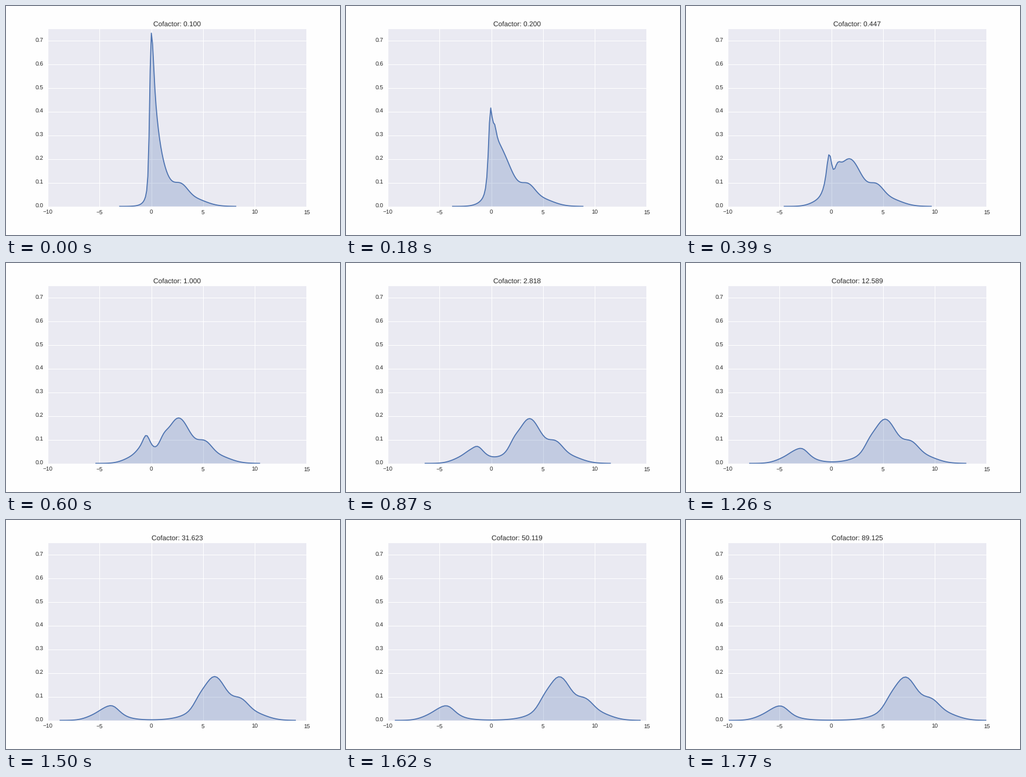
Animation, 576 px wide and 396 px high, one loop 1800 ms. Source, as a matplotlib script:

```python
import numpy as np
import matplotlib.pyplot as plt
from matplotlib.animation import FuncAnimation

FRAMES, INTERVAL = 60, 30
GRID_SIZE, SCOTT, CUT = 100, 0.07, 3
LOW, HIGH = -5.14, 10.25
BLUE, INK = "#4C72B0", "#262626"

# Populations on the asinh scale: mass, mean, spread
MIXTURE = [
    (.060, -1.70, .93),
    (.125, -.48, .68),
    (.022, -.48, .22),
    (.033, 1.15, .36),
    (.561, 2.63, 1.15),
    (.102, 5.16, .68),
    (.103, 6.30, 1.24),
]


def bell(x, mean, sd):
    z = (x - mean) / sd
    return np.exp(-z * z / 2) / (sd * np.sqrt(2 * np.pi))


def make_sample(n=4000):
    """Evenly spaced points on the asinh scale, weighted by the mixture."""
    u = np.linspace(LOW, HIGH, n)
    p = sum(mass * bell(u, mean, sd) for mass, mean, sd in MIXTURE)
    return np.sinh(u), p / p.sum()


def curve(cofactor):
    """Kernel density of the transformed sample, bandwidth tied to its spread."""
    points = np.arcsinh(cofactor * values)
    mean = weights @ points
    width = SCOTT * np.sqrt(weights @ (points - mean) ** 2)
    margin = CUT * SCOTT
    grid = np.linspace(points[0] - margin, points[-1] + margin, GRID_SIZE)
    return grid, bell(grid[:, None], points, width) @ weights


values, weights = make_sample()

plt.rcParams.update({"font.family": "Liberation Sans", "text.hinting": "none"})
fig = plt.figure(figsize=(8, 5.5), dpi=72, facecolor="#FEFEFE")
ax = fig.add_axes([0.125, 0.125, 0.775, 0.775], facecolor="#EAEAF2")
ax.set(xlim=(-10, 15), ylim=(0, 0.75), xticks=range(-10, 16, 5),
       yticks=np.arange(8) / 10)
ax.set_axisbelow(True)
ax.grid(color="white", lw=1)
ax.tick_params(length=0, pad=7, labelsize=10, labelcolor=INK)
ax.tick_params(axis="x", pad=6)
plt.setp(ax.get_yticklabels(), va="center")
for spine in ax.spines.values():
    spine.set_visible(False)

line, = ax.plot([], [], color=BLUE, lw=1.75)
area, = ax.fill([0], [0], facecolor=BLUE, alpha=0.25, lw=0, zorder=1)
title = ax.set_title("", fontsize=12, color=INK, pad=5)


def update(i):
    cofactor = 10 ** (i / 20 - 1)
    x, y = curve(cofactor)
    line.set_data(x, y)
    area.set_xy(np.column_stack([np.r_[x[0], x, x[-1]], np.r_[0, y, 0]]))
    title.set_text(f"Cofactor: {cofactor:.3f}")
    return line, area, title


anim = FuncAnimation(fig, update, frames=FRAMES, interval=INTERVAL,
                     repeat=True, repeat_delay=0)
plt.show()
```
